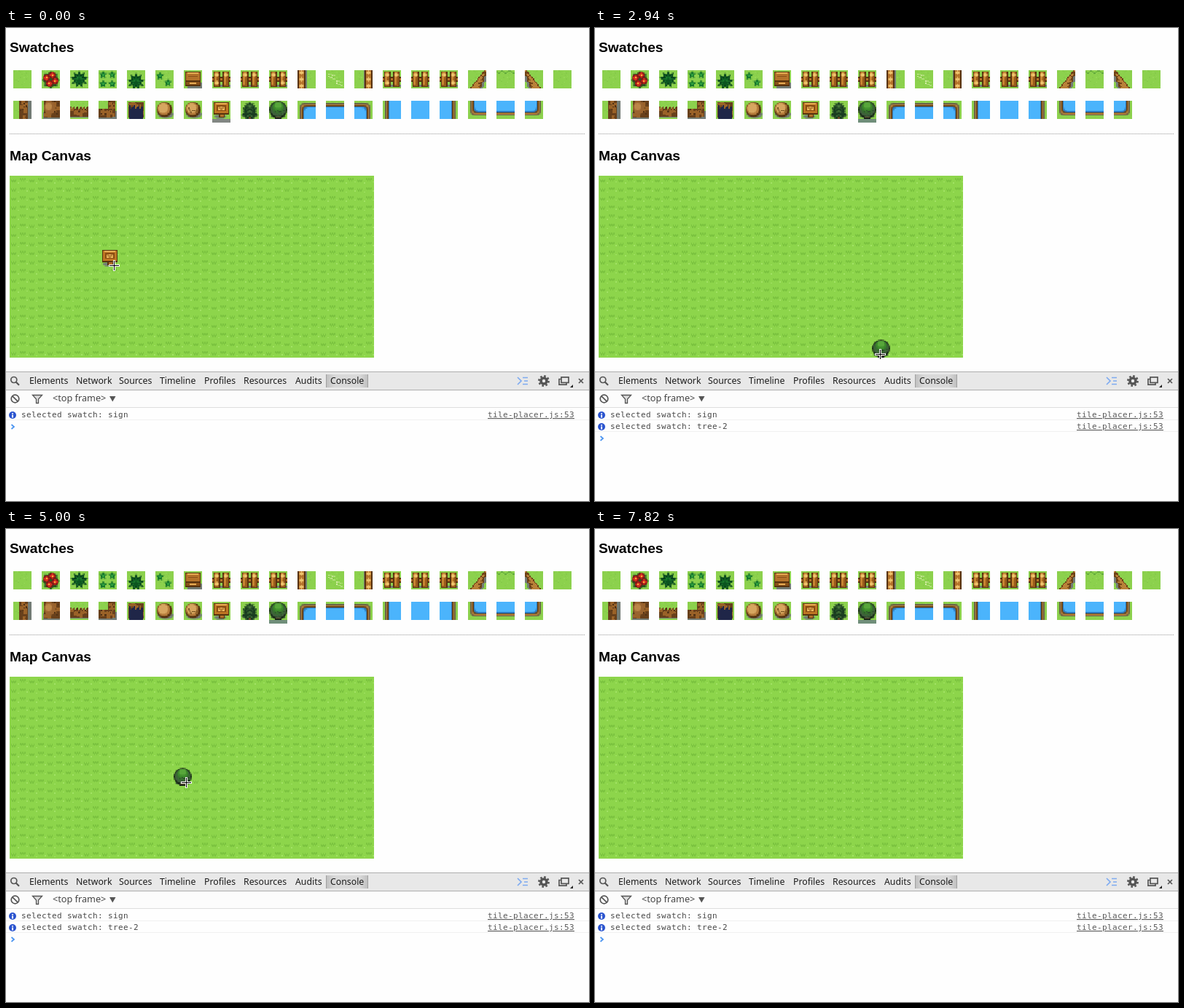
These frames come from a looping animation (800 px wide and 650 px high, 8.11 s). An HTML page with a canvas:

```html
<!DOCTYPE html>
<html lang="en">
<head>
<meta charset="utf-8">
<title>Map canvas</title>
<style>
html, body { margin: 0; width: 100%; height: 100%; overflow: hidden; background: #fefefe; }
svg, canvas { position: absolute; left: 0; top: 0; }
.head { font: bold 19.2px "Liberation Sans", Arial, sans-serif; fill: #000; }
.tab { font: 12.3px "Noto Sans", "Open Sans", sans-serif; fill: #1c1c1c; }
.log { font: 11px "DejaVu Sans Mono", monospace; letter-spacing: .378px; fill: #484848; }
.link { text-decoration: underline; fill: #5a5a5a; }
.icon { fill: none; stroke: #555; stroke-width: 1.7; }
</style>
</head>
<body>
<svg width="800" height="650">
  <defs>
    <linearGradient id="active">
      <stop offset="0" stop-color="#bebebe"/><stop offset=".2" stop-color="#d9d9d9"/>
      <stop offset=".8" stop-color="#d9d9d9"/><stop offset="1" stop-color="#bebebe"/>
    </linearGradient>
    <g id="entry">
      <circle cx="9" cy="532" r="5" fill="#2c55cf"/>
      <path d="M8 529h2v1.5h-2zM8 531.5h2v4h-2z" fill="#fff"/>
      <text class="log link" x="661" y="535">tile-placer.js:53</text>
      <rect y="538" width="800" height="1" fill="#f0f0f0"/>
    </g>
  </defs>
  <text class="head" x="5" y="33">Swatches</text>
  <text class="head" x="5" y="182">Map Canvas</text>
  <path d="M5 145.5H794" stroke="#9a9a9a" stroke-dasharray="1 1"/>

  <rect y="472" width="800" height="26" fill="#e8e8e8"/>
  <rect y="498" width="800" height="24" fill="#fcfcfc"/>
  <path d="M0 472.5H800M0 497.5H800" stroke="#adadad"/>
  <path d="M0 521.5H800" stroke="#dedede"/>
  <rect x="439" y="476" width="58" height="18" fill="url(#active)"/>
  <path d="M439.5 476v18M496.5 476v18" stroke="#a0a0a0"/>
  <g class="tab">
    <text x="32" y="489">Elements</text><text x="96" y="489">Network</text>
    <text x="155" y="489">Sources</text><text x="211" y="489">Timeline</text>
    <text x="272" y="489">Profiles</text><text x="326" y="489">Resources</text>
    <text x="397" y="489">Audits</text><text x="445" y="489">Console</text>
    <text x="64" y="513" style="font-size:12.7px;fill:#444">&lt;top frame&gt;</text>
  </g>
  <g class="icon">
    <circle cx="10.8" cy="483.5" r="4"/><path d="M13.7 486.5l4.3 4.3" stroke-width="2.2"/>
    <circle cx="12.5" cy="509.5" r="5.3"/><path d="M8.8 505.8l7.4 7.4"/>
    <path d="M36.5 504.5h13l-5 5.5v5.5h-3v-5.5z" fill="#ddd" stroke-width="1.3"/>
    <path d="M702 480l5 5-5 5M709 480.5h7M711 485h5M709 489.5h7" stroke="#7eaaf0"/>
    <circle cx="738" cy="485" r="4" stroke-width="3.6"/>
    <circle cx="738" cy="485" r="6.6" stroke-width="2.6" stroke-dasharray="2.59"/>
    <path d="M762 479.8h10v7.5h-10zM762 482.5h-3v7.7h10v-3"/>
    <path d="M786 482l6 6m0-6l-6 6"/>
  </g>
  <path d="M778 490v4h-4z" fill="#222"/>
  <path d="M142 506h8.5l-4.25 7.5z" fill="#555"/>
  <use href="#entry"/>
  <text class="log" x="21" y="535">selected swatch: sign</text>
  <g id="second">
    <use href="#entry" y="16"/>
    <text class="log" x="21" y="551">selected swatch: tree-2</text>
  </g>
  <path id="prompt" d="M7.5 545l3.5 3-3.5 3" fill="none" stroke="#4a94f0" stroke-width="1.7"/>
</svg>
<canvas id="base" width="800" height="650"></canvas>
<canvas id="top" width="800" height="650"></canvas>
<script>
const $ = id => document.getElementById(id);
const TILE = 25, UNIT = 16, MAP = { x: 5, y: 203, cols: 20, rows: 10 };
const GRASS = '#8cd14d', BARK = '#57330f', WOOD = '#b4722a', GLOW = '#e6ac54', STONE = '#737c76', WATER = '#4bb4fc';
const base = $('base').getContext('2d'), top2d = $('top').getContext('2d');
const cell = new OffscreenCanvas(UNIT, UNIT).getContext('2d');
base.imageSmoothingEnabled = top2d.imageSmoothingEnabled = false;
let g = base;

// Drawing helpers; tiles are painted on a small cell and enlarged.
const loop = (n, f) => { for (let i = 0; i < n; i++) f(i); };
const random = n => Math.abs(Math.sin(n * 127.1) * 43758.5) % 1;
function rect(c, x, y, w, h) { g.fillStyle = c; g.fillRect(x, y, w, h); }
function oval(c, x, y, rx, ry = rx) {
  g.fillStyle = c; g.beginPath(); g.ellipse(x, y, rx, ry, 0, 0, 7); g.fill();
}
function star(c, x, y, r, n, inner = .5) {
  g.fillStyle = c; g.beginPath();
  loop(2 * n, i => {
    const a = Math.PI * (i / n - .5), d = i % 2 ? r * inner : r;
    g.lineTo(x + d * Math.cos(a), y + d * Math.sin(a));
  });
  g.fill();
}
function specks(c, n, x, y, w, h, size = 1) {
  loop(n, i => rect(c, Math.floor(x + random(i + n) * w), Math.floor(y + random(i + 3 * n) * h), size, size));
}
function put(ctx, x, y, draw) {
  g = cell;
  g.clearRect(0, 0, UNIT, UNIT);
  draw();
  g = ctx;
  g.drawImage(cell.canvas, x, y, TILE, TILE);
}
const mirror = draw => () => { g.save(); g.translate(UNIT, 0); g.scale(-1, 1); draw(); g.restore(); };
const onGrass = draw => () => { grass(); draw(); };

function grass() {
  rect(GRASS, 0, 0, UNIT, UNIT);
  specks('#86ca49', 16, 0, 0, 16, 16);
  specks('#95d757', 7, 0, 0, 16, 16);
}
function meadow() {
  rect('#8dd54b', 0, 0, UNIT, UNIT);
  loop(4, i => {
    const x = i % 2 * 8 + 3, y = (i >> 1) * 8 + 4 - i % 2;
    loop(5, k => rect('#7cc440', x + k - 2, y - (k % 2 ? 0 : 1), 1, 2));
    rect('#a2e265', x + 4, y + 2, 1, 1);
  });
}
function fern(y, r) {
  star('#06401b', 8, y, r, 9, .55);
  star('#1f8230', 8, y, r * .85, 9, .25);
  star('#0b5420', 8, y + 1, r * .4, 5);
}
function tuft(x, y) { star('#0c6b27', x, y, 3.8, 5); star('#3bb046', x, y, 2.6, 5, .25); }
function post(x, knots) {
  rect(BARK, x, 1, 6, 14);
  rect('#9a5b1b', x + 1, 1, 4, 13);
  rect('#c78431', x + 1, 2, 2, 11);
  loop(knots ? 2 : 1, i => star('#f0c66f', x + 3, 4 + 7 * i, 2.6, 4));
}
const fence = (left, right) => onGrass(() => {
  rect(STONE, 1, 13, 15, 2);
  rect(BARK, 0, 6, 16, 4); rect(WOOD, 0, 7, 16, 2);
  post(1, left); post(9, right);
});
const fences = [fence(true, false), fence(false, false), fence(false, true)];
const sideFence = onGrass(() => {
  rect(STONE, 6, 0, 2, 16); rect(BARK, 0, 0, 7, 16); rect(WOOD, 1, 0, 5, 16);
  loop(3, i => star('#f0c66f', 3.5, 2 + 6 * i, 2.6, 4));
});
const crate = onGrass(() => {
  rect(STONE, 3, 11, 13, 5); rect(BARK, 1, 1, 14, 13);
  rect(WOOD, 2, 2, 12, 7); rect('#8a5119', 2, 10, 12, 3);
  loop(2, i => rect(GLOW, 3 + 2 * i, 2 + 9 * i, 10 - 4 * i, 1));
  rect('#8a5119', 4, 5, 8, 1);
});
function sign() {
  oval(STONE, 7, 14, 5, 1.8);
  rect(BARK, 6, 11, 5, 4); rect(WOOD, 7, 11, 3, 3);
  rect(BARK, 1, 1, 14, 11); rect('#be7523', 2, 2, 12, 9); rect(GLOW, 3, 2, 10, 1);
  rect('#8a4c12', 4, 4, 8, 5); rect('#edb85c', 5, 5, 6, 3);
  loop(6, i => rect('#8a4c12', 5 + i, 7 - Math.abs(i - 2.5), 1, 1));
}
function tree() {
  oval('#4f773d', 8, 13.7, 6.5, 2);
  oval('#172a16', 8, 7.8, 8, 7.6);
  rect('#172015', 5, 13, 6, 3); rect('#695c39', 6, 14, 4, 1);
  ['#3f5f3c', '#376f2f', '#3d8b2b', '#57a63a'].forEach((c, i) =>
    oval(c, 8, 7.5 - 1.2 * i, 7 - 1.3 * i, 6.5 - 1.3 * i));
  specks('#2d4f2b', 10, 2, 8, 12, 5);
}
function pine() {
  oval('#5d7e4c', 8, 13, 7, 2.5);
  loop(3, i => {
    star('#193d20', 8, 11 - 3 * i, 8 - 1.7 * i, 7, .6);
    star('#4a793d', 8, 11 - 3 * i, 5 - i, 5, .3);
  });
  rect('#684724', 7, 14, 2, 2);
}
function flowers() {
  star('#285522', 8, 8.5, 8, 8, .75);
  loop(4, i => {
    const x = 8 + 4 * Math.cos(i * 1.57 + .3), y = 8 + 4 * Math.sin(i * 1.57 + .3);
    oval('#7d1816', x, y, 3); star('#dd3322', x, y, 2.8, 4, .6); rect('#f3ae3c', x | 0, y | 0, 1, 1);
  });
}
const petals = onGrass(() => loop(16, i => {
  const s = i >> 3, k = i % 8;
  rect('#d3eba4', 2 + 7 * s + k % 4 * 1.5, 3 + 6 * s + (k * 3 % 5), 1, 1);
}));
const slope = onGrass(() => loop(16, y => {
  const x = Math.round(14 - .8 * y), w = 3 + Math.round(.4 * y);
  rect(STONE, x + w, y, 2, 1); rect('#6e4218', x, y, w, 1); rect('#b98138', x + 1, y, w - 2 - y % 3, 1);
}));
const ledge = onGrass(() => loop(16, x => rect('#64ab3d', x, Math.round(1 + Math.sin(x)), 1, 1)));

// A rough earth face filling one box of the tile.
function earth(x, y, w, h) {
  rect('#68401b', x, y, w, h);
  specks('#9a6228', w * h / 12 | 0, x, y, w - 2, h - 2, 3);
  specks('#4f3015', w * h / 16 | 0, x, y, w - 1, h - 1);
}
const cliffSide = onGrass(() => { rect(STONE, 12, 0, 4, 16); earth(5, 0, 8, 16); });
const cliffCorner = onGrass(() => {
  rect(STONE, 1, 10, 15, 6); earth(2, 0, 14, 15);
  oval('#9a6430', 7, 6, 5, 6); oval('#bd8748', 6, 5, 3);
});
const cliffFront = onGrass(() => {
  rect(STONE, 0, 14, 16, 1); earth(0, 5, 16, 9);
  loop(16, x => rect(GRASS, x, 4, 1, 1 + x * 5 % 3));
});
const cliffEnd = onGrass(() => { rect(STONE, 0, 9, 16, 7); earth(8, 0, 7, 14); earth(0, 7, 12, 8); });
const cave = onGrass(() => {
  earth(1, 1, 14, 14);
  loop(12, i => { const y = 4 + i * 3 % 4; rect('#1f2648', 2 + i, y, 1, 16 - y); });
});
const rock = cracked => onGrass(() => {
  oval(STONE, 9, 12, 7, 3.5);
  [BARK, '#b57c3b', '#d7a660'].forEach((c, i) => oval(c, 8 - i * .6, 7.7 - i * .7, 7 - 1.4 * i, 6.8 - 1.3 * i));
  if (cracked) loop(3, i => loop(5, k => rect('#75501f', 4 + 3 * i + k / 2, 6 + 2 * i - k * (i - 1), 1, 1)));
});
// Sides that have a bank are named by their letters.
const water = (sides = '') => onGrass(() => ['#6c6246', '#b3803c', '#6a461b', '#2b79bd', WATER].forEach((c, i) => {
  const edge = side => sides.includes(side) ? i + 2 : -9;
  const x = edge('l'), y = edge('t');
  g.fillStyle = c; g.beginPath();
  g.roundRect(x, y, 16 - edge('r') - x, 15 - edge('b') - y, 4);
  g.fill();
}));

const swatches = [
  [grass, onGrass(flowers), onGrass(() => fern(8, 8)),
    onGrass(() => loop(4, i => tuft(4 + i % 2 * 8, 4 + (i >> 1) * 8))),
    onGrass(() => fern(10, 8)), onGrass(() => loop(2, i => tuft(4 + 7 * i, 5 + 6 * i))),
    crate, ...fences, sideFence, petals, mirror(sideFence), ...fences, slope, ledge, mirror(slope), grass],
  [cliffSide, cliffCorner, cliffFront, cliffEnd, cave, rock(false), rock(true),
    onGrass(sign), onGrass(pine), onGrass(tree),
    ...['lt', 't', 'tr', 'l', '', 'r', 'lb', 'b', 'rb'].map(water)]
];
swatches.forEach((row, j) => row.forEach((draw, i) => put(base, 10 + 39 * i, 58 + 42 * j, draw)));
loop(MAP.cols * MAP.rows, i =>
  put(base, MAP.x + i % MAP.cols * TILE, MAP.y + (i / MAP.cols | 0) * TILE, meadow));

// Each move curves from the last stop: first change, last change, steps, bend, end.
const LOOP = 8110, PICK = 1015;
const moves = [
  [290, 1310, 8, [430, 25], [377, 145]],
  [1460, 2490, 8, [381, 238], [389, 393]],
  [2640, 3660, 8, [390, 535.5], [396, 330]],
  [3960, 5000, 8, [75, 348], [247, 348]],
  [5150, 5890, 6, [470, 345], [490, 336]],
  [6340, 6340, 1, [490, 330], [490, 324]],
  [6490, 7380, 7, [365, -245], [605, 456]],
  [7530, 7820, 3, [690, 560], [760, 690]]
];
const stops = [{ t: 0, x: 148, y: 326 }];
for (const [first, last, steps, bend, end] of moves) {
  const from = stops.at(-1);
  loop(steps, i => {
    const u = 1 - (1 - (i + 1) / steps) ** 1.5;
    const curve = (a, b, c) => Math.floor((1 - u) ** 2 * a + 2 * u * (1 - u) * b + u * u * c);
    stops.push({
      t: first + (last - first) * i / Math.max(1, steps - 1),
      x: curve(from.x, bend[0], end[0]), y: curve(from.y, bend[1], end[1])
    });
  });
}

const inMap = p => p.x >= MAP.x && p.x < MAP.x + MAP.cols * TILE &&
  p.y >= MAP.y && p.y < MAP.y + MAP.rows * TILE;
const snap = (v, origin) => origin + Math.floor((v - origin) / TILE) * TILE;

function cross(x, y) {
  rect('#fff', x - 7, y - 1, 15, 3); rect('#fff', x - 1, y - 7, 3, 15);
  rect('#000', x - 6, y, 13, 1); rect('#000', x, y - 6, 1, 13);
}
const arrowShape = new Path2D('M0 0V14.5L3.4 11.3 5.7 16.5 8 15.5 5.7 10.4 10.3 10.2Z');
function arrow(x, y) {
  g.save(); g.translate(x, y);
  g.strokeStyle = '#fff'; g.lineWidth = 2; g.stroke(arrowShape);
  g.fillStyle = '#000'; g.fill(arrowShape);
  g.restore();
}

g = top2d;
const start = performance.now();
function frame() {
  const t = (performance.now() - start) % LOOP;
  const n = stops.findLastIndex(s => s.t <= t);
  const now = stops[n], before = stops[Math.max(0, n - 1)], picked = t >= PICK;
  g.clearRect(0, 0, 800, 650);
  rect(picked ? '#708e7a' : '#828783', picked ? 361 : 283, 125, TILE, 5);
  // The stamp trails the pointer by one step.
  if (inMap(before)) put(top2d, snap(before.x, MAP.x), snap(before.y, MAP.y), picked ? tree : sign);
  (inMap(now) ? cross : arrow)(now.x, now.y);
  $('second').style.display = picked ? '' : 'none';
  $('prompt').setAttribute('transform', `translate(0 ${picked ? 16 : 0})`);
  requestAnimationFrame(frame);
}
frame();
</script>
</body>
</html>
```
